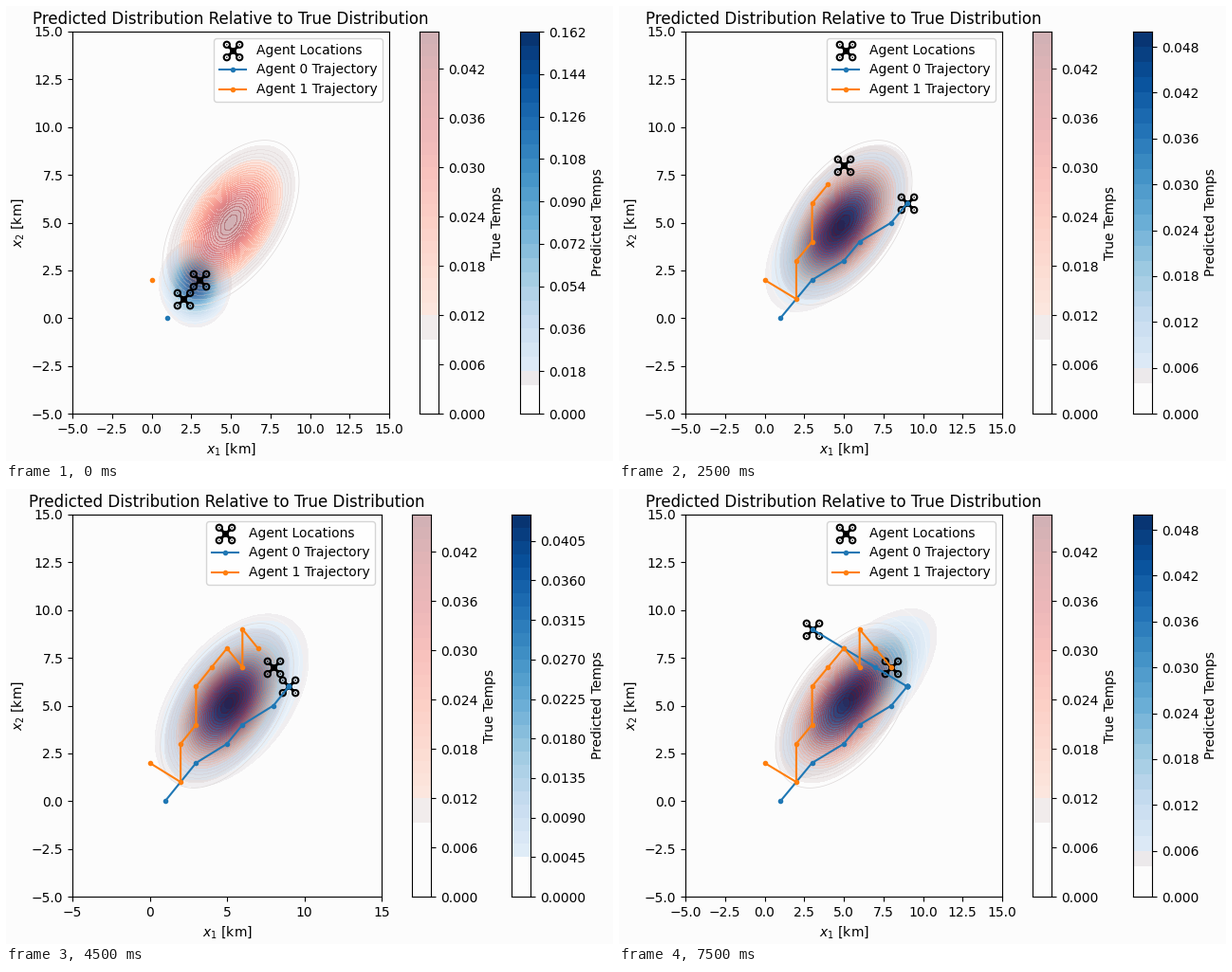
These frames come from a looping animation (640x480 px, 8000 ms). A matplotlib script:

```python
import numpy as np
import matplotlib.pyplot as plt
from matplotlib.animation import FuncAnimation
from matplotlib.path import Path
from matplotlib.ticker import MaxNLocator

W, H, FRAMES = 640, 480, 16
PAPER = np.full(3, 252 / 255)
GREY = np.array([236, 233, 235]) / 255
DUSK = np.array([215, 200, 200]) / 255
ALPHA = 0.3

# Agents' grid positions; the last one is held.
ROUTES = [
    [(1, 0), (3, 2), (5, 3), (6, 4), (8, 5)] + [(9, 6)] * 6
    + [(7, 7), (5, 8), (3, 9)],
    [(0, 2), (2, 1), (2, 3), (3, 4), (3, 6), (4, 7), (5, 8), (6, 7),
     (6, 9), (7, 8), (8, 7)],
]

# Estimate at each step: mean x, mean y, sigma x, sigma y, peak density.
ESTIMATES = [
    (2.75, 1.80, 1.00, 1.00, .1590), (3.20, 2.60, 1.20, 1.02, .1370),
    (3.75, 3.40, 1.48, 1.20, .1100), (4.13, 3.98, 1.73, 1.42, .0797),
    (4.40, 4.40, 1.92, 1.75, .0590), (4.65, 4.70, 2.05, 1.95, .0490),
    (4.80, 4.85, 2.06, 1.99, .0475), (4.90, 5.03, 2.06, 2.01, .0445),
    (5.05, 5.00, 2.12, 2.05, .0430), (5.31, 5.27, 2.15, 1.96, .0430),
    (5.40, 5.30, 2.10, 2.00, .0455), (5.50, 5.42, 2.06, 2.02, .0459),
    (5.55, 5.50, 2.17, 2.01, .0475), (5.62, 5.53, 2.23, 2.02, .0475),
    (5.72, 5.60, 2.26, 1.98, .0490), (5.78, 5.65, 2.27, 1.97, .0490),
]
TRUTH = (5, 5, 2, 2, 1 / (2 * np.pi * np.sqrt(12)))

AXIS = np.linspace(-5, 15, 240)
X, Y = np.meshgrid(AXIS, AXIS)


def density(mx, my, sx, sy, peak):
    """Bivariate normal whose correlation follows from its peak."""
    u, v = (X - mx) / sx, (Y - my) / sy
    q = min(1, (1 / (2 * np.pi * peak * sx * sy)) ** 2)
    r = np.sqrt(1 - q)
    return peak * np.exp(-(u * u - 2 * r * u * v + v * v) / (2 * q))


def levels_for(peak):
    return MaxNLocator(31, min_n_ticks=1).tick_values(0, peak)


def band_colors(name, levels, low, high, grey):
    t = (levels[:-1] + levels[1:]) / 2 / levels[-1]
    rgb = plt.get_cmap(name)(t)[:, :3]
    rgb[t < high] = grey
    rgb[t < low] = PAPER
    return rgb


def polygon(points):
    return Path(np.vstack([points, points[:1]]), closed=True)


def disc(cx, cy, r, turn=1):
    a = turn * np.linspace(0, 2 * np.pi, 28, endpoint=False)
    return polygon(np.column_stack([cx + r * np.cos(a), cy + r * np.sin(a)]))


def drone():
    box = np.array([(-1, -1), (1, -1), (1, 1), (-1, 1)])
    parts = [polygon(box * 0.31)]
    for angle in (np.pi / 4, -np.pi / 4):
        c, s = np.cos(angle), np.sin(angle)
        parts.append(polygon(box * (0.66, 0.13) @ np.array([(c, s), (-s, c)])))
    for cx, cy in box * 0.615:
        parts += [disc(cx, cy, 0.385), disc(cx, cy, 0.19, -1),
                  disc(cx, cy, 0.07)]
    return Path.make_compound_path(*parts)


DRONE = drone()
TRUE_LEVELS = levels_for(TRUTH[-1])
TRUE_FIELD = density(*TRUTH)

fig = plt.figure(figsize=(W / 100, H / 100), dpi=100, facecolor=PAPER)


def panel(left, right):
    return fig.add_axes([left / W, 50 / H, (right - left) / W, 403 / H],
                        facecolor=PAPER)


def tick_plan(levels):
    ticks = levels[::int(np.ceil(len(levels) / 10))]
    digits = 4 if round(ticks[1] * 1e4) % 10 else 3
    return ticks, digits


def color_bar(left, levels, colors, label):
    cax = panel(left, left + 20)
    cax.pcolormesh([0, 1], levels, colors[:, None, :])
    ticks, digits = tick_plan(levels)
    cax.set_xticks([])
    cax.yaxis.tick_right()
    cax.yaxis.set_label_position("right")
    cax.set_yticks(ticks, [f"{v:.{digits}f}" for v in ticks])
    cax.set_ylim(0, levels[-1])
    cax.set_ylabel(label)


def draw(step):
    fig.clear()
    estimate = ESTIMATES[step]
    levels = levels_for(estimate[-1])
    narrow = tick_plan(levels)[1] == 4
    right, bar1, bar2 = (396, 428, 533) if narrow else (404, 436, 542)

    ax = panel(70, right)
    ax.contourf(X, Y, density(*estimate), levels=levels,
                colors=band_colors("Blues", levels, .07, .12, GREY))
    ax.contourf(X, Y, TRUE_FIELD, levels=TRUE_LEVELS, alpha=ALPHA,
                colors=band_colors("Reds", TRUE_LEVELS, .12, .25, DUSK))
    ax.contour(X, Y, TRUE_FIELD, levels=[.0045], colors="#dcd8d8",
               linewidths=0.5, zorder=1)

    here = [route[min(step + 1, len(route) - 1)] for route in ROUTES]
    ax.scatter(*zip(*here), s=246, marker=DRONE, color="black", linewidths=0,
               label="Agent Locations")
    for i, route in enumerate(ROUTES):
        ax.plot(*zip(*route[:step + 1]), ".-", color=f"C{i}",
                label=f"Agent {i} Trajectory")

    ax.set(xlim=(-5, 15), ylim=(-5, 15),
           xlabel="$x_1$ [km]", ylabel="$x_2$ [km]",
           xticks=np.arange(-5, 16, 5 if narrow else 2.5),
           yticks=np.arange(-5, 16, 2.5))
    ax.set_title("Predicted Distribution Relative to True Distribution")
    ax.legend(loc="upper right")

    reds = band_colors("Reds", TRUE_LEVELS, .18, .25, DUSK)
    color_bar(bar1, TRUE_LEVELS, ALPHA * reds + (1 - ALPHA) * PAPER,
              "True Temps")
    color_bar(bar2, levels, band_colors("Blues", levels, .09, .12, GREY),
              "Predicted Temps")
    return []


anim = FuncAnimation(fig, draw, frames=FRAMES, interval=500, repeat=True,
                     repeat_delay=0, init_func=lambda: [])
plt.show()
```
